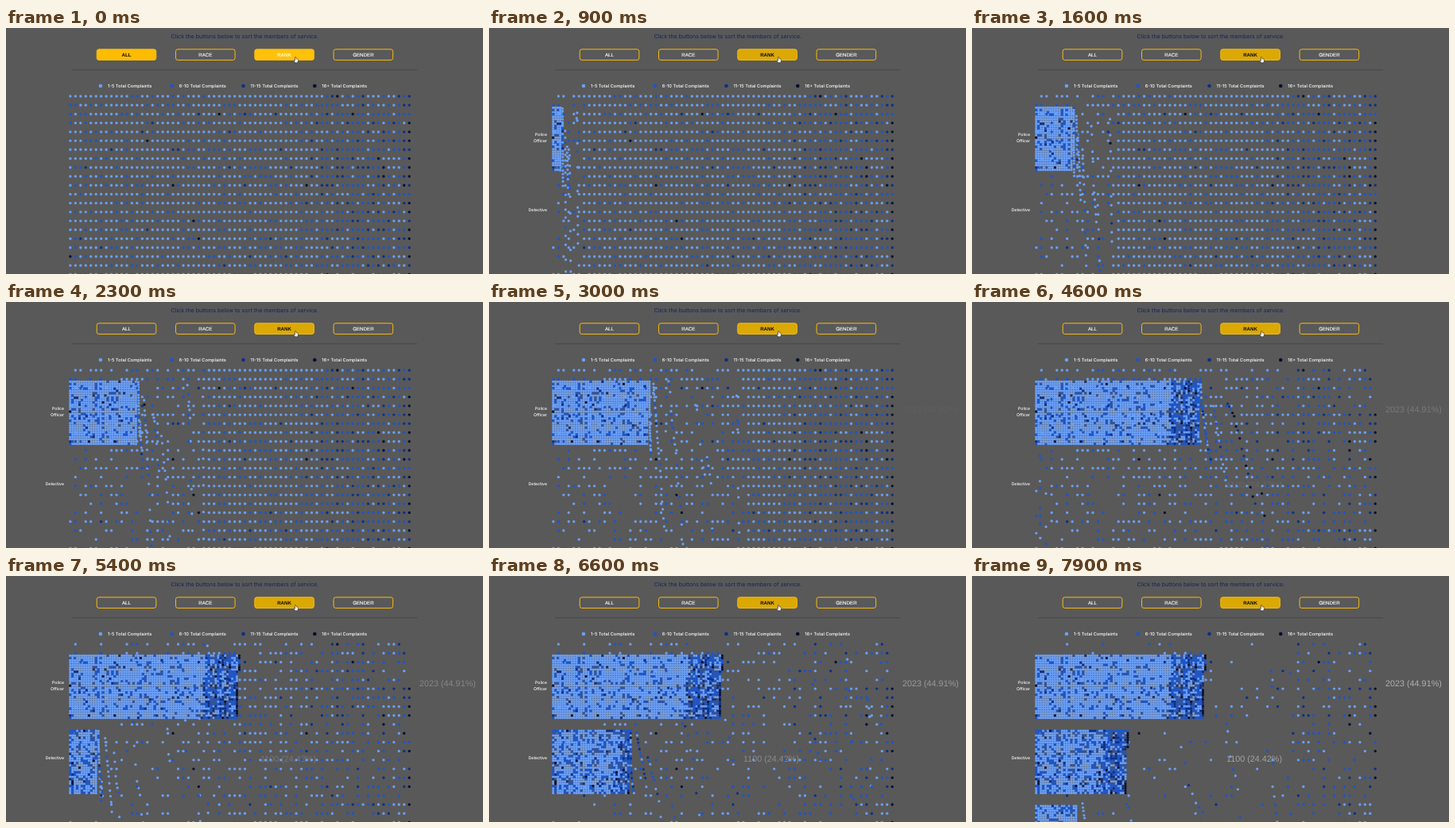
These frames come from a looping animation (600x310 px, 8 s). An HTML page with a canvas:

```html
<!DOCTYPE html>
<html lang="en">
<head>
<meta charset="utf-8">
<title>Complaints by rank</title>
<style>
  html, body { margin: 0; width: 100%; height: 100%; overflow: hidden; background: #595959; }
  svg, canvas { position: absolute; left: 0; top: 0; width: 600px; height: 310px; }
  text { font-family: Inter, sans-serif; text-rendering: geometricPrecision; }
  .btn text { font: 6.2px "Liberation Sans", Arial, sans-serif; text-anchor: middle; fill: #fff; stroke: #fff; stroke-width: .15; }
  .btn rect { fill: #fdbc02; fill-opacity: 0; stroke: #f6bd10; stroke-width: 1; }
  .btn .bold { font-weight: bold; stroke: none; }
  .legend { font-size: 5.7px; font-weight: 500; fill: #fff; }
  .label { font-size: 5.15px; font-weight: 500; text-anchor: end; fill: #fff; }
  .share { font: 10.8px "Liberation Sans", Arial, sans-serif; fill: #fff; }
</style>
</head>
<body>
<svg viewBox="0 0 600 310">
  <text x="300.4" y="12.7" font-size="7.1" text-anchor="middle" fill="#14235c">Click the buttons below to sort the members of service.</text>
  <g id="buttons"></g>
  <path d="M83 52.8H517" stroke="#474747" stroke-width="1"/>
  <g id="legend"></g>
  <g id="labels">
    <text class="label" x="73" y="135.9">Police</text>
    <text class="label" x="73" y="143.5">Officer</text>
    <text class="label" x="73" y="231">Detective</text>
  </g>
  <text class="share" id="share0" x="520" y="138.9">2023 (44.91%)</text>
  <text class="share" id="share1" x="320" y="233.5">1100 (24.42%)</text>
  <path d="M363.5 36.7q.7-.6 1.2 .1l.5 2 1.6.4q.9.3.8 1.2l-.5 2.4-.5 1h-2.9l-1.5-2.3q-.5-.8.2-1l1.2.7z"
        fill="#fff" stroke="#222" stroke-width=".6" stroke-linejoin="round"/>
</svg>
<canvas id="dots"></canvas>
<script>
const LOOP = 8000, COLS = 67, ROWS = 68;
const BLOCK_ROWS = 28, STEP = 2, DUR = 300, START = 400;
const COLORS = ['#6a9ff7', '#1d55c9', '#0d2f86', '#050f30'];
const $ = id => document.getElementById(id);
const clamp = v => Math.max(0, Math.min(1, v));
const ramp = (t, from, len) => clamp((t - from) / len);
const mix = (a, b, k) => 'rgb(' + a.map((v, i) => Math.round(v + (b[i] - v) * k)) + ')';
const ease = u => u < .5 ? 4 * u ** 3 : 1 - 4 * (1 - u) ** 3;

let seed = 20231;
function rand() {
  seed = seed + 0x6D2B79F5 | 0;
  let z = Math.imul(seed ^ seed >>> 15, 1 | seed);
  z = z + Math.imul(z ^ z >>> 7, 61 | z) ^ z;
  return ((z ^ z >>> 14) >>> 0) / 4294967296;
}

// Buttons and legend
function add(parent, tag, attrs, text) {
  const el = document.createElementNS('http://www.w3.org/2000/svg', tag);
  for (const k in attrs) el.setAttribute(k, attrs[k]);
  if (text) el.textContent = text;
  return parent.appendChild(el);
}
const buttons = ['ALL', 'RACE', 'RANK', 'GENDER'].map((name, i) => {
  const g = add($('buttons'), 'g', { class: 'btn' }), x = 114.2 + i * 99.3;
  const rect = add(g, 'rect', { x, y: 26.8, width: 74.6, height: 13.6, rx: 2.6 });
  const text = add(g, 'text', { x: x + 37.3, y: 35.8 }, name);
  return { rect, text };
});
['1-5', '6-10', '11-15', '16+'].forEach((range, i) => {
  const x = 118.9 + i * 89.8;
  add($('legend'), 'circle', { cx: x, cy: 73, r: 2.3, fill: COLORS[i] });
  add($('legend'), 'text', { class: 'legend', x: x + 9, y: 75.1 }, range + ' Total Complaints');
});

// Members, column by column, fewest complaints first
const dots = Array.from({ length: COLS * ROWS }, (_, i) => {
  const col = Math.floor(i / ROWS), row = i % ROWS;
  return { col, x: 80.9 + col * 6.46, y: 86 + row * 11.22, rank: 3 };
});

// Weighted draw of exactly n members for one rank
function draw(rank, n, weight) {
  const free = dots.filter(d => d.rank === 3);
  free.forEach(d => d.key = rand() / weight(d.col));
  free.sort((a, b) => a.key - b.key).slice(0, n).forEach(d => d.rank = rank);
}
const officers = c => .58 - .004 * c;
draw(0, 2023, officers);
draw(1, 1100, c => .24 / (1 - officers(c)));
draw(2, 911, c => (.12 + .0024 * c) / (.76 - officers(c)));

function shade(d) {
  let odds;
  if (d.col === COLS - 1) odds = [0, .1, .4];
  else if (d.col >= 49) odds = [.34, .82, .97];
  else odds = d.rank ? [.68, .95, .985] : [.86, .98, .995];
  const r = rand(), k = odds.findIndex(o => r < o);
  return k < 0 ? 3 : k;
}
dots.forEach(d => d.shade = shade(d));

// Targets: one block per rank, filled in order
let order = 0;
for (let rank = 0; rank < 3; rank++) {
  dots.filter(d => d.rank === rank).forEach((d, n) => {
    d.tx = 80.7 + Math.floor(n / BLOCK_ROWS) * 2.955;
    d.ty = 100.4 + rank * 94.7 + (n % BLOCK_ROWS) * 2.9;
    d.start = START + STEP * order++;
  });
}

const canvas = $('dots'), ctx = canvas.getContext('2d');
const dpr = window.devicePixelRatio || 1;
canvas.width = 600 * dpr;
canvas.height = 310 * dpr;
ctx.scale(dpr, dpr);

function drawDots(t) {
  ctx.clearRect(0, 0, 600, 310);
  const paths = COLORS.map(() => new Path2D());
  for (const d of dots) {
    const p = d.rank < 3 ? ease(ramp(t, d.start, DUR)) : 0;
    const x = p ? d.x + (d.tx - d.x) * p : d.x;
    const y = p ? d.y + (d.ty - d.y) * p : d.y;
    if (y > 312) continue;
    const r = 1.7 - .1 * p;
    paths[d.shade].moveTo(x + r, y);
    paths[d.shade].arc(x, y, r, 0, 7);
  }
  paths.forEach((path, i) => {
    ctx.fillStyle = COLORS[i];
    ctx.fill(path);
  });
}

function drawPanel(t) {
  const k = ramp(t, 40, 160);
  const [all, , rank] = buttons;
  all.rect.style.fillOpacity = 1 - k;
  all.text.style.fill = mix([10, 10, 10], [255, 255, 255], k);
  all.text.classList.toggle('bold', k < .5);
  rank.rect.style.fillOpacity = 1;
  rank.rect.style.fill = mix([255, 193, 10], [219, 168, 4], k);
  rank.text.style.fill = mix([255, 250, 225], [10, 10, 10], k);
  rank.text.classList.add('bold');
  $('labels').style.opacity = ramp(t, 100, 500);
  $('share0').style.opacity = clamp((t - 2700) / 10000);
  $('share1').style.opacity = clamp((t - 3900) / 9000);
}

function frame() {
  const t = performance.now() % LOOP;
  drawPanel(t);
  drawDots(t);
  requestAnimationFrame(frame);
}
frame();
</script>
</body>
</html>
```
